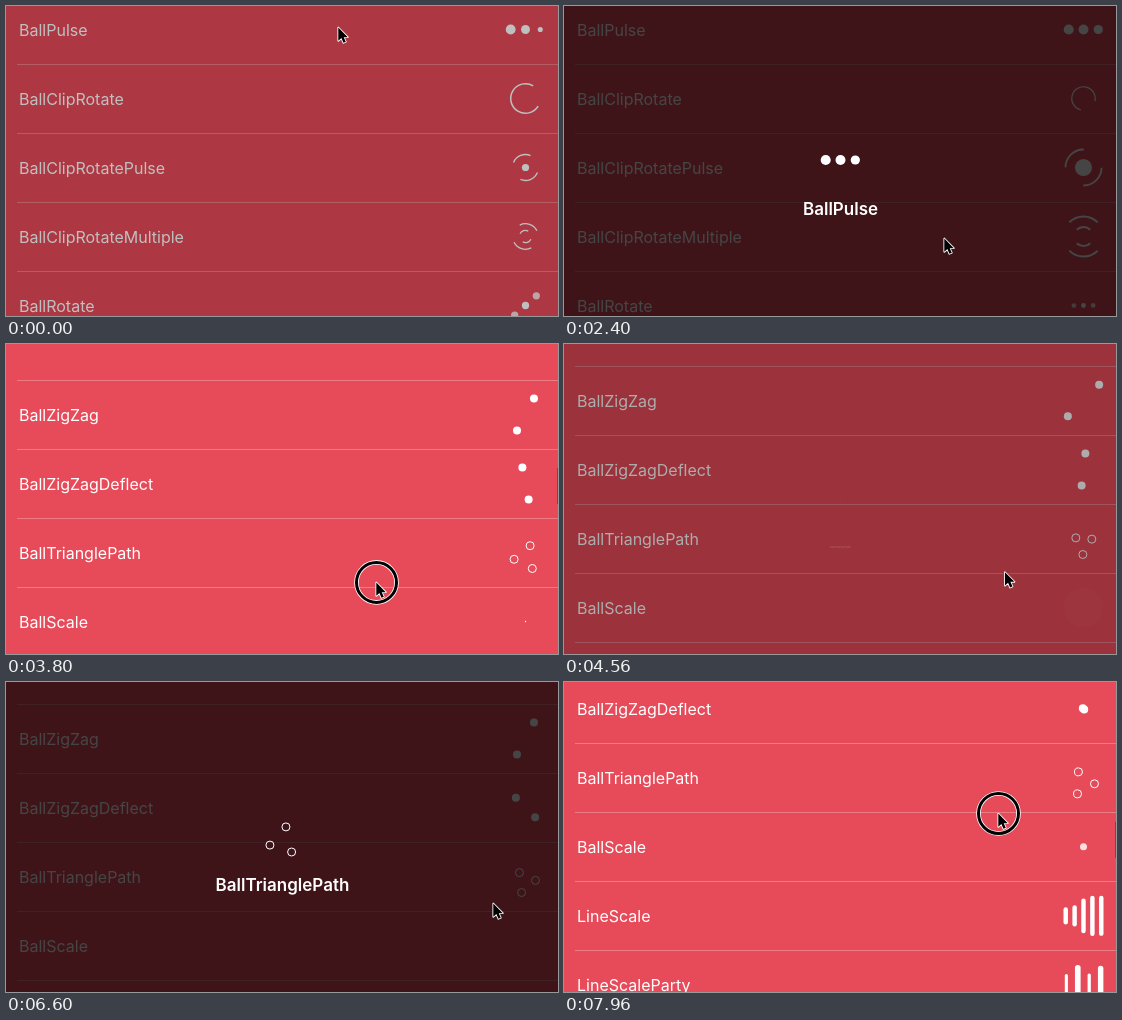
These frames come from a looping animation (552x310 px, 8 s). An HTML page with a canvas:

```html
<!DOCTYPE html>
<html lang="en">
<head>
<meta charset="utf-8">
<title>Activity indicators</title>
<style>
  html, body { margin: 0; width: 100%; height: 100%; overflow: hidden; background: #e74b59; }
  canvas { display: block; width: 552px; height: 310px; }
</style>
</head>
<body>
<canvas id="stage"></canvas>
<script>
const W = 552, H = 310, LOOP = 8000, PITCH = 69, S = 40, R = S / 2, TAU = Math.PI * 2;
const FONT = 'Inter, "Open Sans", sans-serif';
const canvas = document.getElementById('stage');
const dpr = window.devicePixelRatio || 1;
canvas.width = W * dpr;
canvas.height = H * dpr;
const ctx = canvas.getContext('2d');

const clamp = v => Math.min(1, Math.max(0, v));
const mix = (a, b, k) => a + (b - a) * k;
const wrap = v => v - Math.floor(v);

function bezier(x1, y1, x2, y2) {
  const at = (a, b, s) => 3 * (1 - s) * (1 - s) * s * a + 3 * (1 - s) * s * s * b + s * s * s;
  return x => {
    let lo = 0, hi = 1;
    for (let i = 0; i < 20; i++) {
      const mid = (lo + hi) / 2;
      if (at(x1, x2, mid) < x) lo = mid; else hi = mid;
    }
    return at(y1, y2, lo);
  };
}
const linear = x => x;
const inOut = bezier(.42, 0, .58, 1);
const spring = bezier(.2, .68, .18, 1.08);
const pulse = bezier(.09, .57, .49, .9);
const swing = bezier(.7, -.13, .22, .86);
const fling = x => 1 - (1 - x) ** 5;

const ramp = (t, from, to, ease = linear) => ease(clamp((t - from) / (to - from)));
const glide = (t, from, to) => ramp(t, from, to, inOut);

// Falls from 1 to `low` at time `mid`, then returns.
const dip = (u, low, mid, ease = linear) =>
  u < mid ? mix(1, low, ease(u / mid)) : mix(low, 1, ease((u - mid) / (1 - mid)));
// One turn in two eased halves.
const spin = (u, ease = linear) => Math.PI * (u < .5 ? ease(u * 2) : 1 + ease(u * 2 - 1));
// Phase of a cycle that stands at `phase` when the clock reads `when`.
const cycle = (t, period, when, phase) => wrap((t - when) / period + phase);

function dot(x, y, r, alpha = 1) {
  ctx.save();
  ctx.globalAlpha *= alpha;
  ctx.beginPath();
  ctx.arc(x, y, Math.max(0, r), 0, TAU);
  ctx.fill();
  ctx.restore();
}

function ring(x, y, r, width, from = 0, to = TAU) {
  ctx.lineWidth = width;
  ctx.beginPath();
  ctx.arc(x, y, r, from, to);
  ctx.stroke();
}

// Opposite quarter arcs, above and below when unrotated.
function quarters(r, width, rotation) {
  for (const a of [rotation, rotation + Math.PI])
    ring(0, 0, r, width, a + Math.PI / 4, a + Math.PI * 3 / 4);
}

function bar(x, width, height) {
  ctx.beginPath();
  ctx.roundRect(x - width / 2, -height / 2, width, height, width / 2);
  ctx.fill();
}

function ballPulse(t) {
  const u = cycle(t, 750, 1120, .17);
  for (let i = 0; i < 3; i++)
    dot((i - 1) * 14.8, 0, 5 * dip(wrap(u - .16 * i), .3, .3, spring));
}

function ballClipRotate(t) {
  const u = cycle(t, 750, 0, .29), k = dip(u, .6, .5), a = spin(u) - .5;
  ring(0, 0, 19.3 * k, 2 * k, a - Math.PI / 4, a + Math.PI * 5 / 4);
}

function ballClipRotatePulse(t) {
  const u = cycle(t, 1000, 0, .315), k = dip(u, .6, .5, pulse);
  dot(0, 0, 9.5 * dip(u, .3, .3, pulse));
  quarters(R * k, 2 * k, spin(u, pulse));
}

function ballClipRotateMultiple(t) {
  const u = cycle(t, 1000, 0, .61), k = dip(u, .6, .5, inOut), a = spin(u, inOut);
  quarters(R * k, 2 * k, a);
  quarters(9.5 * k, 2 * k, -a);
}

function ballRotate(t) {
  const u = cycle(t, 1000, 0, .21), k = dip(u, .6, .5, swing), a = -spin(u, swing);
  for (let i = -1; i < 2; i++)
    dot(16 * i * k * Math.cos(a), 16 * i * k * Math.sin(a), 4 * k, i ? .8 : 1);
}

// Centre, corner, opposite corner, centre; the second ball mirrors the first.
function zigZag(u) {
  const leg = Math.min(u * 3, 3), away = Math.min(1, leg, 3 - leg);
  const x = 16 * (leg < 1 ? -leg : leg < 2 ? 2 * leg - 3 : 3 - leg), y = -16 * away;
  dot(x, y, 4);
  dot(-x, -y, 4);
}
const ballZigZag = t => zigZag(cycle(t, 700, 3800, .587));
const ballZigZagDeflect = t => zigZag(1 - Math.abs(1 - 2 * cycle(t, 1500, 3800, .233)));

function trianglePath(t, when, phase) {
  const corners = [[0, -16], [16, 16], [-16, 16]];
  const e = inOut(cycle(t, 2000 / 3, when, phase));
  corners.forEach(([x, y], i) => {
    const [nx, ny] = corners[(i + 1) % 3];
    ring(mix(x, nx, e), mix(y, ny, e), 4, 1);
  });
}
const ballTrianglePath = t => trianglePath(t, 3800, .37);

function ballScale(t) {
  const e = inOut(cycle(t, 1000, 3800, .13));
  dot(0, 0, R * e, 1 - e);
}

function lineScale(t) {
  const u = cycle(t, 1000, 7960, .23);
  for (let i = 0; i < 5; i++)
    bar((i - 2) * S * 2 / 9, S / 9, S * dip(wrap(u - .1 * i), .4, .5, spring));
}

function lineScaleParty(t) {
  [[1260, .4], [430, .95], [1010, .62], [730, .1]].forEach(([period, phase], i) => {
    const k = .75 + .25 * Math.cos(TAU * cycle(t, period, 7960, phase));
    bar((i - 1.5) * S * 2 / 7, S / 7 * k, S * k);
  });
}

const ROWS = [
  ['BallPulse', ballPulse],
  ['BallClipRotate', ballClipRotate],
  ['BallClipRotatePulse', ballClipRotatePulse],
  ['BallClipRotateMultiple', ballClipRotateMultiple],
  ['BallRotate', ballRotate],
  ['', () => {}],
  ['BallZigZag', ballZigZag],
  ['BallZigZagDeflect', ballZigZagDeflect],
  ['BallTrianglePath', ballTrianglePath],
  ['BallScale', ballScale],
  ['LineScale', lineScale],
  ['LineScaleParty', lineScaleParty]
];

const DIALOGS = [
  { name: 'BallPulse', start: -85, icon: ballPulse },
  { name: 'BallTrianglePath', start: 4450, icon: t => trianglePath(t, 5720, 0) }
];
const HOLD = 2972, FADE = 250;

// Distance of the closing upward drag, shared by pointer and list.
const drag = t => .36 * Math.max(0, t - 7700);
const scrollAt = t =>
  367 * ramp(t, 3100, 3640, fling) + 14 * glide(t, 3810, 4120) + 1.05 * drag(t);

const cursorAt = t => [
  332 + 48 * glide(t, 0, 1000) - 10 * glide(t, 3100, 3700) + 117 * glide(t, 4000, 5000)
    - 5 * glide(t, 6900, 7440) - 48 * glide(t, 7500, 7960),
  21 + 211 * glide(t, 0, 1000) + 18 * glide(t, 2500, 3080) - 12 * glide(t, 3100, 3700)
    - 17 * glide(t, 4000, 5000) + 4 * glide(t, 6900, 7440) - drag(t)
];
const touching = t => (t > 3100 && t < 3250) || (t > 3700 && t < 4000) || t > 7700;

function at(x, y, scale, draw) {
  ctx.save();
  ctx.translate(x, y);
  ctx.scale(scale, scale);
  draw();
  ctx.restore();
}

function drawList(t) {
  const scroll = scrollAt(t);
  ctx.font = '400 16px ' + FONT;
  ctx.textAlign = 'left';
  ROWS.forEach(([name, icon], i) => {
    const y = 23.5 + PITCH * i - scroll;
    if (y < -40 || y > H + 40) return;
    ctx.fillStyle = ctx.strokeStyle = '#fff';
    ctx.fillText(name, 13, y + 6.3);
    at(519.5, y, 1, () => icon(t));
    ctx.fillStyle = 'rgba(255,255,255,.27)';
    ctx.fillRect(11, Math.round(y + 34.4), W - 11, 1);
  });
  const shown = ramp(t, 3100, 3140) - ramp(t, 4200, 4400) + ramp(t, 7700, 7760);
  ctx.fillStyle = `rgba(40,20,24,${.4 * shown})`;
  ctx.fillRect(551, 124 + (scroll - 367) * .14, 1, 36);
}

function drawDialog(t, { name, start, icon }) {
  const fadeOut = 1 - ramp(t, start + HOLD, start + HOLD + FADE);
  const shade = Math.min(ramp(t, start, start + FADE), fadeOut);
  const scale = Math.min(ramp(t, start + 85, start + FADE), fadeOut);
  ctx.fillStyle = `rgba(0,0,0,${.73 * shade})`;
  ctx.fillRect(0, 0, W, H);
  if (scale <= 0) return;
  ctx.globalAlpha = scale;
  ctx.fillStyle = ctx.strokeStyle = '#fff';
  at(276.5, 154, scale, () => icon(t));
  ctx.font = '600 17px ' + FONT;
  ctx.textAlign = 'center';
  at(276.5, 203, scale, () => ctx.fillText(name, 0, 6));
  ctx.globalAlpha = 1;
}

const ARROW = new Path2D('M0 0V15.5L3.6 12.3L6 17.8L8.7 16.6L6.3 11.2H11Z');

function drawCursor(t) {
  const [x, y] = cursorAt(t);
  if (touching(t)) {
    ctx.strokeStyle = '#fff';
    ring(x + .5, y + .4, 20, 4.6);
    ctx.strokeStyle = '#000';
    ring(x + .5, y + .4, 20, 3);
  }
  at(x + .3, y + .5, .86, () => {
    ctx.lineJoin = 'round';
    ctx.strokeStyle = '#fff';
    ctx.lineWidth = 2;
    ctx.stroke(ARROW);
    ctx.fillStyle = '#000';
    ctx.fill(ARROW);
  });
}

const origin = performance.now();
function render() {
  const t = Math.max(0, performance.now() - origin) % LOOP;
  ctx.setTransform(dpr, 0, 0, dpr, 0, 0);
  ctx.fillStyle = '#e74b59';
  ctx.fillRect(0, 0, W, H);
  drawList(t);
  DIALOGS.forEach(dialog => drawDialog(t, dialog));
  drawCursor(t);
  requestAnimationFrame(render);
}
render();
</script>
</body>
</html>
```
